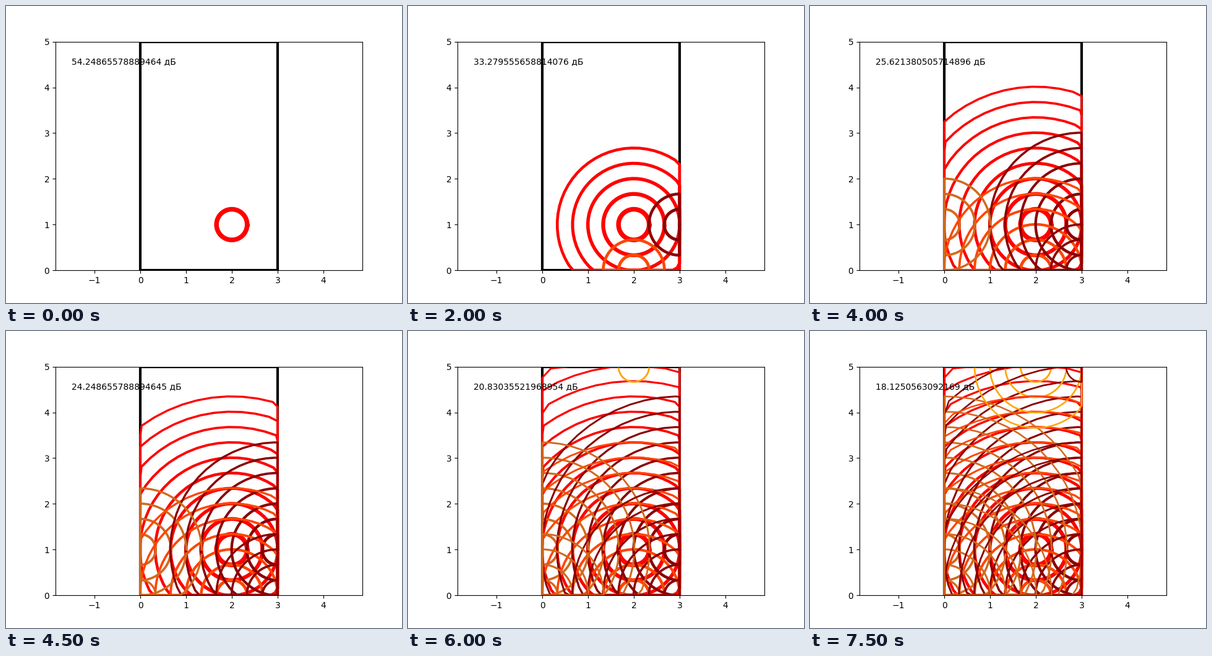
Write a matplotlib script that moves like this. It is 640 px wide and 480 px high and loops after 8000 ms.

```python
import math

import matplotlib.pyplot as plt
import numpy as np
from matplotlib.animation import FuncAnimation

STEPS = 16
STEP_MS = 500
WIDTH, HEIGHT = 3, 5
SPEED = 0.335  # distance covered per step
ANGLES = np.arange(0, 2 * np.pi, 0.1)


def level(step):
    return 40 - 30 * math.log10(SPEED * (step + 1))


def reflect(wave, x, y, color):
    """Wave re-emitted from a wall point once its parent has reached it."""
    px, py, _, birth = wave
    delay = math.ceil(math.hypot(x - px, y - py) / SPEED)
    return x, y, color, birth + delay


source = (2, 1, "red", 0)
floor = reflect(source, 2, 0, "orangered")
right = reflect(source, 3, 1, "darkred")
left = reflect(source, 0, 1, "chocolate")
ceiling = reflect(source, 2, 5, "orange")
waves = [
    source, floor, right, left, ceiling,
    reflect(floor, 3, 0, "darkred"),
    reflect(floor, 0, 0, "chocolate"),
    reflect(ceiling, 3, 5, "darkred"),
]

fig = plt.figure(figsize=(6.4, 4.8), dpi=100)
ax = fig.add_axes([0.125, 0.11, 0.775, 0.77])
half = HEIGHT * 496 / 369.6 / 2
ax.set_xlim(WIDTH / 2 - half, WIDTH / 2 + half)
ax.set_ylim(0, HEIGHT)
ax.add_patch(plt.Rectangle((0, 0), WIDTH, HEIGHT, fill=False, lw=3))
label = ax.text(-1.5, 4.5, "")


def add_ring(wave, step):
    x, y, color, birth = wave
    r = SPEED * (step - birth + 1)
    xs = np.clip(x + r * np.cos(ANGLES), 0, WIDTH)
    ys = np.clip(y + r * np.sin(ANGLES), 0, HEIGHT)
    line, = ax.plot(xs, ys, color=color, lw=level(step) / 10,
                    scalex=False, scaley=False)
    return step, line


rings = [add_ring(w, s) for s in range(STEPS) for w in waves if s >= w[3]]


def draw(step):
    for first, line in rings:
        line.set_visible(first <= step)
    label.set_text(f"{level(step)} дБ")
    return [label]


draw(0)
anim = FuncAnimation(fig, draw, frames=STEPS, interval=STEP_MS,
                     repeat=True, repeat_delay=0)
plt.show()
```
